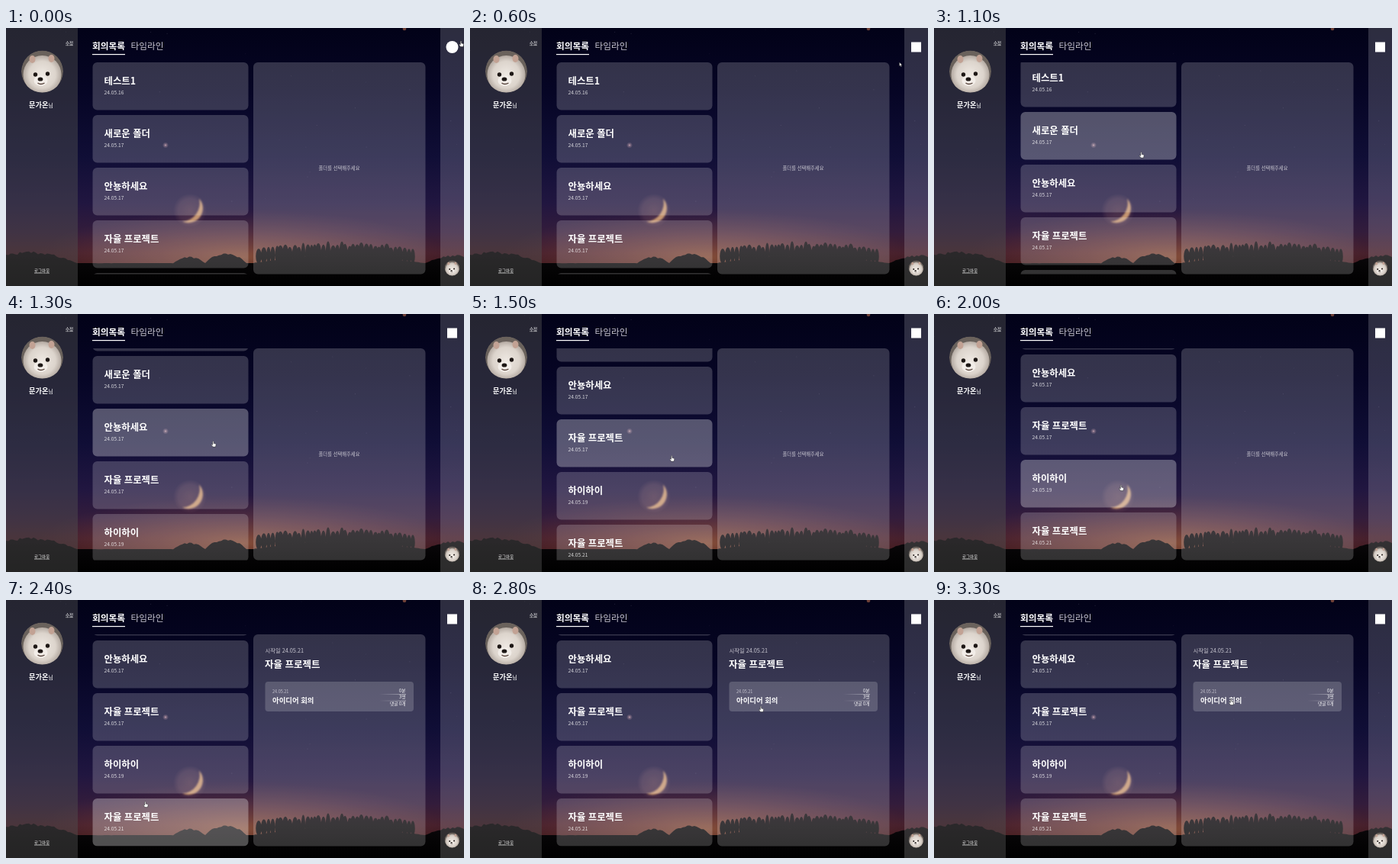
An HTML page that plays this animation: 600x338 px, repeating every 3400 ms.

```html
<!DOCTYPE html>
<html lang="ko">
<head>
<meta charset="utf-8">
<title>회의목록</title>
<style>
  html, body { margin: 0; width: 100%; height: 100%; overflow: hidden; background: #020218; }
  svg { display: block; width: 100vw; height: 100vh; }
  text { font-family: "Noto Sans CJK KR", "Noto Sans CJK", "Noto Sans", sans-serif; fill: #fff; }
  .bold { font-weight: 700; }
  .soft { fill: #c8c6d0; }
</style>
</head>
<body>
<svg viewBox="0 0 600 338" preserveAspectRatio="none">
  <defs>
    <linearGradient id="sky" x2="0" y2="1">
      <stop offset="0" stop-color="#020218"/>
      <stop offset=".25" stop-color="#060525"/>
      <stop offset=".5" stop-color="#100e36"/>
      <stop offset=".68" stop-color="#211640"/>
      <stop offset=".79" stop-color="#331c3b"/>
      <stop offset=".87" stop-color="#451f2c"/>
      <stop offset=".92" stop-color="#401a1e"/>
      <stop offset="1" stop-color="#050305"/>
    </linearGradient>
    <radialGradient id="dusk">
      <stop offset="0" stop-color="#c07a48" stop-opacity=".5"/>
      <stop offset=".5" stop-color="#a8604a" stop-opacity=".26"/>
      <stop offset="1" stop-color="#8a4a4a" stop-opacity="0"/>
    </radialGradient>
    <linearGradient id="land" x2="0" y2="1">
      <stop offset="0" stop-color="#100b10"/>
      <stop offset=".6" stop-color="#050405"/>
      <stop offset="1" stop-color="#000"/>
    </linearGradient>
    <radialGradient id="halo">
      <stop offset="0" stop-color="#c98a78" stop-opacity=".22"/>
      <stop offset=".7" stop-color="#b07a78" stop-opacity=".16"/>
      <stop offset="1" stop-color="#b07a78" stop-opacity="0"/>
    </radialGradient>
    <radialGradient id="glow">
      <stop offset="0" stop-color="#c8a0a8"/>
      <stop offset=".35" stop-color="#a87c90" stop-opacity=".5"/>
      <stop offset="1" stop-color="#a87c90" stop-opacity="0"/>
    </radialGradient>
    <linearGradient id="rule">
      <stop offset="0" stop-color="#fff" stop-opacity="0"/>
      <stop offset="1" stop-color="#fff" stop-opacity=".75"/>
    </linearGradient>
    <radialGradient id="fur" cy=".5">
      <stop offset="0" stop-color="#eee8e2"/>
      <stop offset=".7" stop-color="#dcd4cc"/>
      <stop offset="1" stop-color="#b4aaa2"/>
    </radialGradient>
    <filter id="blur" x="-.3" y="-.3" width="1.6" height="1.6"><feGaussianBlur stdDeviation="1"/></filter>
    <clipPath id="listClip"><rect x="113" y="45" width="205" height="277.5"/></clipPath>
    <clipPath id="round"><circle r="27.5"/></clipPath>
    <g id="avatar" clip-path="url(#round)">
      <circle r="27.5" fill="#6a625c"/>
      <ellipse cy="4" rx="25" ry="25" fill="url(#fur)"/>
      <ellipse cx="-13" cy="-16" rx="4" ry="5" fill="#c2a294"/>
      <ellipse cx="12" cy="-17" rx="4" ry="5" fill="#c2a294"/>
      <ellipse cx="-2" cy="12" rx="9" ry="7" fill="#f2ede8"/>
      <circle cx="-9" cy="4" r="2.7" fill="#1d1715"/>
      <circle cx="7" cy="3" r="2.7" fill="#1d1715"/>
      <ellipse cx="-2.5" cy="10" rx="3.4" ry="2.6" fill="#1d1715"/>
      <path d="M-6 15Q-2 18 3 15" fill="none" stroke="#57443c" stroke-width="1.3"/>
    </g>
  </defs>

  <rect width="600" height="338" fill="url(#sky)"/>
  <ellipse cx="310" cy="300" rx="270" ry="62" fill="url(#dusk)"/>
  <g id="stars" fill="#a89ab8"></g>
  <circle cx="209" cy="153.5" r="4" fill="url(#glow)"/>
  <circle cx="522" cy="1" r="2.3" fill="#8a5040" opacity=".8"/>
  <circle cx="241" cy="239" r="22" fill="url(#halo)"/>
  <path d="M253 223.5A19 19 0 0 1 231 253.5A24 24 0 0 0 253 223.5Z" fill="#dba878" opacity=".85" filter="url(#blur)"/>
  <path id="trees" fill="url(#land)"/>

  <rect width="94" height="338" fill="#505050" fill-opacity=".45"/>
  <g fill="#fff" fill-opacity=".19">
    <rect x="569" width="31" height="338" fill-opacity=".17"/>
    <rect x="324" y="45" width="225.5" height="277.5" rx="6"/>
  </g>

  <text x="78" y="21.5" font-size="5.5">수정</text>
  <path d="M78 22.7h10M37 321.2h20" stroke="#ddd" stroke-width=".5"/>
  <use href="#avatar" x="47.5" y="57"/>
  <text x="30" y="104.3" font-size="9.2" class="bold">문가온<tspan font-size="7.2" font-weight="400">님</tspan></text>
  <text x="37" y="320" font-size="5.5">로그아웃</text>

  <text x="113" y="28.3" font-size="11.7" class="bold">회의목록</text>
  <text x="163.5" y="28.3" font-size="11.7" class="soft">타임라인</text>
  <rect x="113" y="34" width="43" height="1.2" fill="#fff"/>

  <g clip-path="url(#listClip)"><g id="list"></g></g>

  <text id="hint" x="436.5" y="185.8" font-size="6.3" text-anchor="middle" class="soft">폴더를 선택해주세요</text>
  <g id="detail">
    <text x="339.5" y="68.6" font-size="7.3" class="soft">시작일 24.05.21</text>
    <text x="339" y="89" font-size="12.5" class="bold">자율 프로젝트</text>
    <rect x="339.5" y="107" width="194.5" height="39" rx="4" fill="#fff" fill-opacity=".18"/>
    <text x="349" y="122" font-size="5.5" class="soft">24.05.21</text>
    <text x="349" y="134.7" font-size="9.4" class="bold">아이디어 회의</text>
    <g font-size="5.7" text-anchor="end">
      <text x="523.5" y="120.6">0분</text>
      <text x="523.5" y="129.4">3명</text>
      <text x="523.5" y="137.6">댓글 0개</text>
    </g>
    <rect x="489" y="123.2" width="35" height=".6" fill="url(#rule)"/>
    <rect x="489" y="131.7" width="35" height=".6" fill="url(#rule)"/>
  </g>

  <circle id="iconHover" cx="584.5" cy="25" r="8" fill="#fff"/>
  <rect id="iconIdle" x="578" y="18.5" width="13" height="13" fill="#fff"/>
  <use href="#avatar" transform="translate(584.5 314.5) scale(.364)"/>

  <g id="cursor" stroke="#222" stroke-width=".5" stroke-linejoin="round" fill="#fff">
    <path id="arrow" d="M0 0V5L1.2 3.9L2 5.7L2.9 5.3L2.1 3.6H3.7Z"/>
    <path id="hand" d="M-.7.6Q0-.4.7.6V3L3 3.6Q3.8 3.9 3.6 4.8L3 7.6H-.5L-2.4 4.9Q-2.4 3.9-1.5 4.2L-.7 4.9Z"/>
  </g>
</svg>
<script>
const LOOP = 3400, TICK = 100;
const PITCH = 69, TOP = 45, CARD_H = 62.5;
const $ = id => document.getElementById(id);

const folders = [
  ["테스트1", "24.05.16"], ["새로운 폴더", "24.05.17"], ["안뇽하세요", "24.05.17"],
  ["자율 프로젝트", "24.05.17"], ["하이하이", "24.05.19"], ["자율 프로젝트", "24.05.21"]
];

// [time, x, y]
const cursorKeys = [
  [0, 596, 17], [200, 591, 25], [400, 574, 39], [600, 562.5, 45], [700, 562.5, 45],
  [800, 540, 59], [900, 430, 112], [1000, 310, 153], [1100, 271.5, 162.5], [1300, 271.5, 166.5],
  [1400, 270, 172], [1700, 252.5, 212.5], [1900, 251, 217], [2000, 245, 224],
  [2200, 193, 262], [2400, 182.5, 264], [2500, 183, 264], [2600, 205, 247],
  [2700, 300, 186], [2800, 381, 139], [2900, 391, 130], [3300, 389, 130]
];
// [time, offset]
const scrollKeys = [
  [1000, 0], [1100, 4], [1200, 26], [1300, 59], [1400, 91],
  [1500, 114], [1600, 126], [1700, 130]
];

function sample(keys, t) {
  const next = keys.findIndex(k => k[0] > t);
  if (next < 0) return keys[keys.length - 1].slice(1);
  if (next === 0) return keys[0].slice(1);
  const a = keys[next - 1], b = keys[next];
  const p = (t - a[0]) / (b[0] - a[0]);
  return a.slice(1).map((v, i) => v + (b[i + 1] - v) * p);
}

function randomFrom(seed) {
  return () => (seed = (seed * 16807) % 2147483647) / 2147483647;
}

function ellipsePath(cx, cy, rx, ry) {
  return `M${cx - rx} ${cy}a${rx} ${ry} 0 1 1 ${2 * rx} 0a${rx} ${ry} 0 1 1 ${-2 * rx} 0Z`;
}

function drawScenery() {
  const rand = randomFrom(77);
  let dots = "";
  for (let i = 0; i < 26; i++) {
    dots += `<circle cx="${rand() * 600}" cy="${rand() * 230}" r=".5" opacity="${0.1 + rand() * 0.2}"/>`;
  }
  $("stars").innerHTML = dots;

  // Low shrubs follow the hills: [center, half width, height]
  const hills = [[30, 65, 15], [240, 22, 9], [288, 28, 14], [435, 118, 10], [592, 45, 11]];
  const GROUND = 309;
  let d = "M0 338V300";
  for (let x = 0; x < 600; x += 3) {
    const rise = Math.max(1, ...hills.map(([c, w, h]) => h * (1 - ((x - c) / w) ** 2)));
    d += `L${x} ${GROUND - rise * (0.85 + 0.25 * rand())}`;
  }
  d += "L600 300V338Z";

  // Separate tall trees on the right
  for (let x = 331; x < 538; x += 4 + 3 * rand()) {
    const height = 17 + 12 * Math.sin(Math.PI * (x - 305) / 260) * (0.5 + 0.6 * rand());
    d += ellipsePath(x, GROUND - height / 2, 2.6 + 1.6 * rand(), height / 2);
  }
  $("trees").setAttribute("d", d);
}

function drawList() {
  $("list").innerHTML = folders.map(([name, date], i) => `
    <g transform="translate(113 ${TOP + i * PITCH})">
      <rect class="card" x=".5" width="204" height="${CARD_H}" rx="6" fill="#fff"/>
      <text x="15.5" y="29.2" font-size="12.4" class="bold">${name}</text>
      <text x="15.5" y="41.6" font-size="6.7" fill-opacity=".8">${date}</text>
    </g>`).join("");
}

function show(id, visible) {
  $(id).setAttribute("visibility", visible ? "visible" : "hidden");
}

drawScenery();
drawList();
const cards = document.querySelectorAll(".card");

function render(time) {
  const t = Math.floor((time % LOOP) / TICK) * TICK;
  const [x, y] = sample(cursorKeys, t);
  const [scroll] = sample(scrollKeys, t);
  const opened = t >= 2300;

  const inList = x > 113 && x < 318 && y > TOP && y < 322;
  const row = (y - TOP + scroll) / PITCH;
  const hovered = inList && row % 1 < CARD_H / PITCH ? Math.floor(row) : -1;
  const onIcon = x > 574 && y < 36;
  const onMeeting = opened && x > 339 && x < 534 && y > 107 && y < 146;
  const pointing = hovered >= 0 || onIcon || onMeeting;

  $("list").setAttribute("transform", `translate(0 ${-scroll})`);
  cards.forEach((card, i) => card.setAttribute("fill-opacity", i === hovered ? 0.3 : 0.19));
  show("hint", !opened);
  show("detail", opened);
  show("iconHover", onIcon);
  show("iconIdle", !onIcon);
  show("hand", pointing);
  show("arrow", !pointing);
  $("cursor").setAttribute("transform", `translate(${x} ${y})`);
}

function loop() {
  render(performance.now());
  requestAnimationFrame(loop);
}
loop();
</script>
</body>
</html>
```
